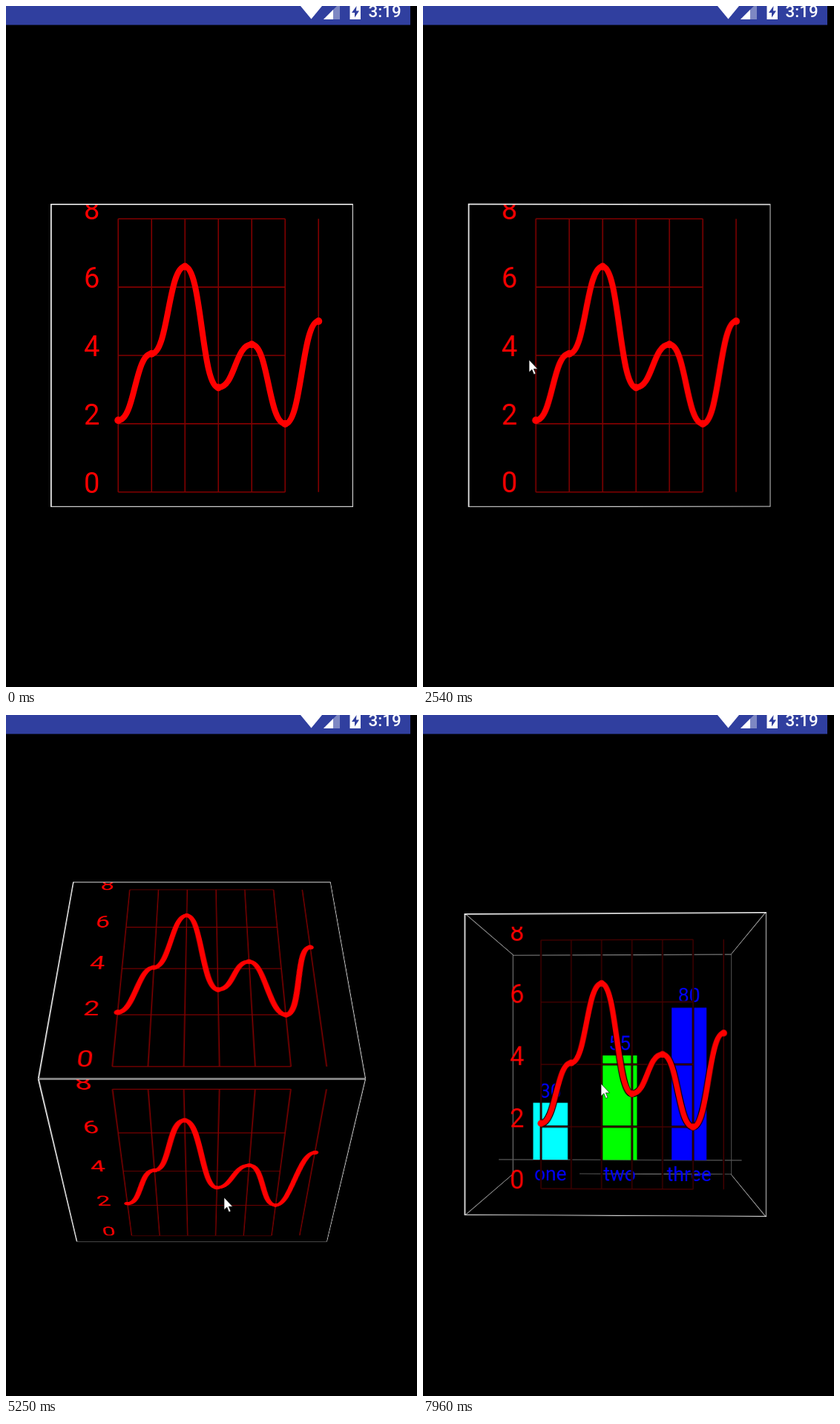
These frames come from a looping animation (554 px wide and 916 px high, 8000 ms). An HTML page:

```html
<!DOCTYPE html>
<html lang="en">
<head>
<meta charset="utf-8">
<title>Chart cube</title>
<style>
  html, body { margin: 0; width: 100%; height: 100%; overflow: hidden; background: #000; }
  svg { display: block; position: absolute; left: 0; top: 0; }
  text { font-family: Roboto, sans-serif; }
  #stage {
    position: absolute; left: 0; top: 0; width: 554px; height: 916px; overflow: hidden;
    perspective: 1073px; perspective-origin: 263.75px 469.75px;
  }
  #cube, #layers {
    position: absolute; left: 59.75px; top: 265.75px; width: 408px; height: 408px;
    transform-style: preserve-3d;
  }
  .plane { position: absolute; left: 0; top: 0; width: 408px; height: 408px; }
  .plane svg { overflow: hidden; }
  #cube .plane { background: #000; backface-visibility: hidden; }
</style>
</head>
<body>
<div id="stage">
  <div id="cube"></div>
  <div id="layers"></div>
</div>
<svg width="554" height="916">
  <rect width="545" height="25.5" fill="#303f9f"/>
  <g fill="#fff">
    <path d="M397 0H426L411.5 17.5Z"/>
    <path d="M428 18L450 -4V18Z" opacity=".38"/>
    <path d="M428 18L441 5V18Z"/>
    <path d="M463.5 0H478V18H463.5Z"/>
    <text x="488.5" y="15" font-size="22.4" font-weight="500">3:19</text>
  </g>
  <path d="M472.5 0L466 9H470V15.5L476 6.5H472Z" fill="#303f9f"/>
  <path id="cursor" d="M0 0V16.5L3.8 13L6.5 19.5L9 18.5L6.3 12.2H11.5Z"
    fill="#fff" stroke="#000" stroke-width=".6"/>
</svg>
<script>
const $ = id => document.getElementById(id);
const HALF = 204;

const plane = (transform, art) =>
  `<div class="plane" style="transform:${transform}"><svg width="408" height="408">${art}</svg></div>`;
const stroke = (d, color, width) =>
  `<path d="${d}" fill="none" stroke="${color}" stroke-width="${width}"/>`;

// Line chart
const values = [2.1, 4.05, 6.6, 3.06, 4.32, 2, 5];
const px = i => 91.25 + 45 * i;
const py = v => 387.8 - 45.95 * v;

let grid = '', curve = '', dots = '', digits = '';
values.forEach((v, i) => {
  const x = px(i), y = py(v), mid = x - 22.5;
  grid += `M${x} ${py(8)}V${py(0)}`;
  curve += i ? `C${mid} ${py(values[i - 1])} ${mid} ${y} ${x} ${y}` : `M${x} ${y}`;
  dots += `<circle cx="${x}" cy="${y}" r="5"/>`;
});
for (let v = 0; v <= 8; v += 2) {
  grid += `M${px(0)} ${py(v)}H${px(5)}`;
  digits += `<text x="45" y="${py(v) + .7}" font-size="38">${v}</text>`;
}
const ink = `<g fill="#f00">${stroke(curve, '#f00', 8)}${dots}${digits}</g>`;
const border = stroke('M408 .8H.8V408', '#fff', 1.6) + stroke('M407.4 0V407.4H0', '#ccc', 1.2);

const face = stroke(grid, 'rgba(255,0,0,.5)', 1.6) + ink + border;
const out = `translateZ(${HALF}px)`;
const turns = ['', 'rotateY(90deg)', 'rotateY(-90deg)', 'rotateX(90deg)', 'rotateX(-90deg)'];
$('cube').innerHTML = turns.map(turn => plane(`${turn} ${out}`, face)).join('');

// Bar chart
const bars = [[30, 'one', '#0ff'], [55, 'two', '#0f0'], [80, 'three', '#00f']];
const barArt = stroke('M0 364H408', '#555', 1.4) + bars.map(([v, name, color], i) => {
  const width = 58.2, x = width * (2 * i + 1), mid = x + width / 2, top = 364 - 3.183 * v;
  return `<rect x="${x}" y="${top}" width="${width}" height="${364 - top}" fill="${color}"/>
    <g fill="#00f" font-size="33" text-anchor="middle">
    <text x="${mid}" y="${top - 9}">${v}</text><text x="${mid}" y="399">${name}</text></g>`;
}).join('');

const lineArt = stroke(grid, '#000', 3.2) + stroke(grid, 'rgba(255,0,0,.27)', 1.5)
  + stroke(curve, '#000', 10.5) + ink;
const back = stroke('M125 407.5H407.5V.7H.7V408', '#888', 1.4);
const sides = stroke('M1 0V408M407 0V408', '#909090', 1.8);
$('layers').innerHTML = plane(`translateZ(${-HALF}px)`, back)
  + plane(`rotateX(90deg) ${out}`, sides)
  + plane(`rotateX(-90deg) ${out}`, sides)
  + plane('translateZ(-59px)', barArt)
  + plane('translateZ(100px)', lineArt)
  + plane(out, border);

// The picture advances in ticks; the cursor runs straight between these points.
const LOOP = 8000, TICK = 135, LEAD = 30, OPEN = 54;
const path = [
  [1, 560, 436], [9, 417, 463], [14, 262, 482], [19, 143, 476],
  [26, 469, 482], [27, 475, 482], [28, 488, 480], [31, 298, 428], [34, 195, 425],
  [36, 290, 698], [39, 294, 649], [45, 302, 473], [51, 310, 379],
  [58, 242.4, 490], [59, 240, 496]
];
const DRAGS = [
  { from: 9, to: 19, axis: 0 },
  { from: 26, to: 34, axis: 0 },
  { from: 36, to: 51, axis: 1 },
  { from: 58, to: 59, axis: 0 }
];
const DEGREES_PER_PX = [.656, .846];

function cursorAt(tick) {
  const i = Math.max(1, path.findIndex(p => p[0] >= tick));
  const [t0, x0, y0] = path[i - 1], [t1, x1, y1] = path[i];
  const u = (tick - t0) / (t1 - t0);
  return [x0 + (x1 - x0) * u, y0 + (y1 - y0) * u];
}

// All faces look alike, so a quarter turn changes nothing.
const quarter = a => a - 90 * Math.round(a / 90);

function draw(now) {
  const tick = Math.floor((now % LOOP + LEAD) / TICK), open = tick >= OPEN;
  const cursor = cursorAt(tick), angles = [0, 0];
  const drag = DRAGS.find(d => tick >= d.from && tick <= d.to);
  if (drag) {
    const k = drag.axis;
    angles[k] = quarter(DEGREES_PER_PX[k] * (cursorAt(drag.from)[k] - cursor[k]));
  }
  const [yaw, pitch] = angles;
  $('cube').style.transform = $('layers').style.transform =
    `translateZ(${-HALF}px) rotateX(${pitch}deg) rotateY(${-yaw}deg)`;
  $('cube').style.display = open ? 'none' : 'block';
  $('layers').style.display = open ? 'block' : 'none';
  $('cursor').setAttribute('transform', `translate(${cursor})`);
}

const start = performance.now();
function loop() {
  draw(performance.now() - start);
  requestAnimationFrame(loop);
}
loop();
</script>
</body>
</html>
```
